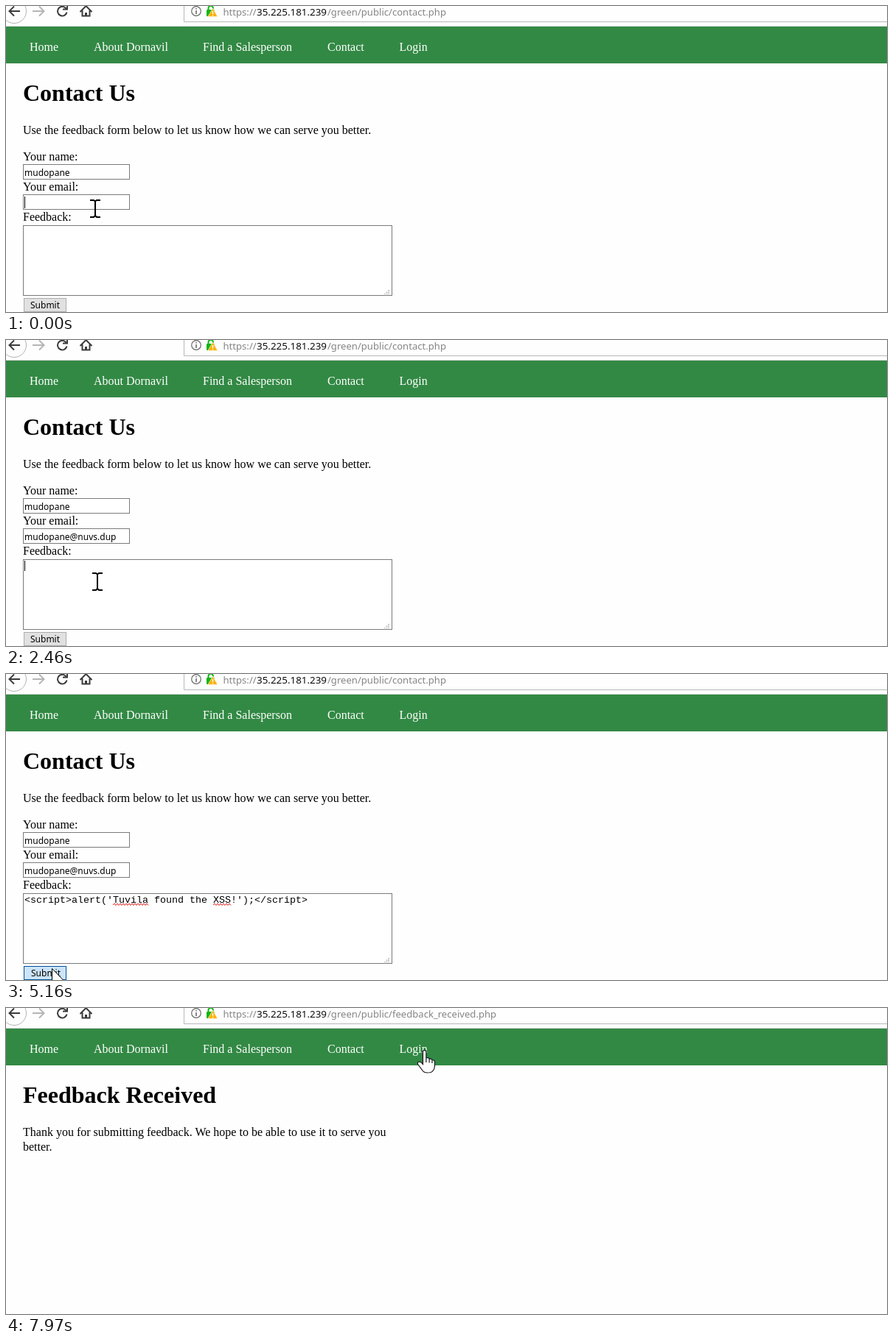
An HTML page that plays this animation: 1195x416 px, repeating every 8 s.

```html
<!DOCTYPE html>
<html lang="en">
<head>
<meta charset="utf-8">
<title>Feedback form</title>
<style>
  html, body { margin: 0; width: 100%; height: 100%; overflow: hidden; background: #fefefe; }
  svg { display: block; width: 100%; height: 100%; }
  text { white-space: pre; }
  .page { font: 16px "Liberation Serif", serif; }
  .title { font: bold 32px "Liberation Serif", serif; }
  .ui { font: 12px "Noto Sans", "Open Sans", sans-serif; }
  .menu { font: 11.5px "Noto Sans", "Open Sans", sans-serif; }
  .url { font: 13.1px "Noto Sans", "Open Sans", sans-serif; fill: #858585; }
  .code { font: 13.333px "Liberation Mono", monospace; }
  .field { fill: #fff; stroke: #7a7a7a; }
  .icon { fill: none; stroke: #3b3b3d; stroke-width: 2; }
  .caret { stroke: #000; }
  u, .u { text-decoration: underline; }
</style>
</head>
<body>
<svg viewBox="0 0 1195 416" preserveAspectRatio="none">
  <rect width="1195" height="416" fill="#fefefe"/>

  <g id="toolbar">
    <path d="M0 27.5H1195" stroke="#d4d4d6"/>
    <circle cx="11" cy="7" r="16.5" fill="#fdfdfd" stroke="#b4b4b6"/>
    <path class="icon" d="M19 7H5M11 .5L4.5 7L11 13.500"/>
    <path class="icon" style="stroke:#b5b5b7" d="M36 7H51M45 .5L51.500 7L45 13.500"/>
    <path id="reload" class="icon" d="M81.500 3.500A6.300 6.300 0 1 0 82.500 8.500M83 -1V4.500H77"/>
    <path id="stop" class="icon" d="M69.500 1L82 13.500M82 1L69.500 13.500"/>
    <path class="icon" d="M100.500 8L108.500 0L116.500 8M103.500 6V13.500H113.500V6"/>
    <path d="M107 9h3v5h-3z" fill="#3b3b3d"/>
    <path d="M241.500 -1V21.500H1196" fill="none" stroke="#b8b8ba"/>
    <circle cx="258" cy="7" r="6.300" fill="none" stroke="#6a6a6c" stroke-width="1.200"/>
    <path d="M258 6V11M258 3V4.600" stroke="#6a6a6c" stroke-width="1.600"/>
    <path d="M274.500 6V3a3.200 3.200 0 0 1 6.400 0V6" fill="none" stroke="#12b512" stroke-width="2"/>
    <rect x="272" y="5" width="11" height="9" rx="1" fill="#12b512"/>
    <path d="M280.500 3L287 14.500H274Z" fill="#ffb000" stroke="#fff" stroke-width=".7"/>
    <path d="M280.500 7V11M280.500 12V13.500" stroke="#fff" stroke-width="1.400"/>
    <g class="url">
      <text x="294.500" y="13">https://</text>
      <text x="340" y="13" fill="#0c0c0d" style="font-size:13.400px">35.225.181.239</text>
      <text id="path" x="436" y="13"></text>
    </g>
  </g>

  <g class="page">
    <rect y="28" width="1195" height="50" fill="#328944"/>
    <g id="nav" fill="#fff"></g>
  </g>

  <g id="form" class="page">
    <text class="title" x="23" y="129">Contact Us</text>
    <text x="23" y="174">Use the feedback form below to let us know how we can serve you better.</text>
    <text x="23" y="210">Your name:</text>
    <rect class="field" x="23.500" y="215.500" width="144" height="20"/>
    <text class="ui" x="25" y="231">mudopane</text>
    <text x="23" y="251">Your email:</text>
    <rect class="field" x="23.500" y="256.500" width="144" height="20"/>
    <text id="email" class="ui" x="25" y="272"></text>
    <path id="emailCaret" class="caret" d="M.5 259V275"/>
    <text x="23" y="292">Feedback:</text>
    <rect class="field" x="23.500" y="298.500" width="500" height="95"/>
    <path d="M519 386v6M516.500 388.500v3.500M514 391v1" stroke="#a8a8a8" stroke-width="1.500" stroke-dasharray="1.500 1"/>
    <g id="payload">
      <text id="script" class="code" x="25" y="311"></text>
      <path id="squiggle" fill="none" stroke="#e02020"/>
    </g>
    <path id="areaCaret" class="caret" d="M.5 300V314"/>
    <rect id="button" x="24.500" y="397.500" width="57" height="18"/>
    <text id="submit" class="ui" y="411">Submit</text>
  </g>

  <g id="thanks" class="page">
    <text class="title" x="23" y="129">Feedback Received</text>
    <text x="23" y="174">Thank you for submitting feedback. We hope to be able to use it to serve you</text>
    <text x="23" y="194">better.</text>
  </g>

  <g id="menu" class="menu">
    <path d="M128 332H284V420H128Z" fill="#000" opacity=".2"/>
    <path d="M128 331H283V420H128Z" fill="#000" opacity=".35"/>
    <rect x="124.500" y="328.500" width="156" height="100" fill="#f1f1f1" stroke="#c4c4c4"/>
    <path d="M148 349.500H279" stroke="#d2d2d2"/>
    <rect id="hover" x="126" width="153" height="18" fill="#90c8f6"/>
    <text x="150" y="344"><tspan class="u">U</tspan>ndo</text>
    <text x="150" y="365">Cu<tspan class="u">t</tspan></text>
    <text x="150" y="383"><tspan class="u">C</tspan>opy</text>
    <text x="150" y="401"><tspan class="u">P</tspan>aste</text>
    <text x="150" y="419" fill="#6d6d6d"><tspan class="u">D</tspan>elete</text>
  </g>

  <path id="arrow" d="M.5 .5V23.500L5.700 18.500L9.500 26.700L13 25.200L9.300 17H16.500Z" fill="#fff" stroke="#000"/>
  <path id="beam" d="M-7 -11H-2L0 -9.500L2 -11H7M0 -10V10M-7 12H-2L0 10L2 12H7" fill="none" stroke="#000" stroke-width="2"/>
  <path id="hand" d="M-1.500 18V2.500a2.200 2.200 0 0 1 4.400 0V11q3.600 -1.300 4.200 1.300q3.300 -.9 4 1.500q3.400 -.4 3.400 2.600V22q0 4 -3 7Q10 31 4.500 31Q0 31 -2 28L-8.300 19.500Q-9.500 16.500 -6.500 16Q-4.500 16 -1.500 19.500ZM2.900 11v6M7.100 12.500v5M11 14v4" fill="#fff" stroke="#16161c" stroke-width="1.200"/>
</svg>

<script>
const LOOP = 8000;
const EMAIL = 'mudopane@nuvs.dup';
const SCRIPT = "<script>alert('Tuvila found the XSS!');<\/script>";
const $ = id => document.getElementById(id);
const show = (id, on) => $(id).setAttribute('visibility', on ? 'visible' : 'hidden');
const set = (id, attrs) => { for (const k in attrs) $(id).setAttribute(k, attrs[k]); };
const write = (id, s) => { if ($(id).textContent !== s) $(id).textContent = s; };

// Pointer poses: time, shape, x, y. Each holds until the next.
const poses = [
  [0, 'beam', 121, 275], [440, '', 0, 0], [1950, 'arrow', 115, 283],
  [2080, 'arrow', 117, 288], [2210, 'beam', 120, 310], [2335, 'beam', 123, 323], [2460, 'beam', 124, 328],
  [2900, 'arrow', 124, 328], [3050, 'arrow', 151, 357], [3170, 'arrow', 158, 370],
  [3300, 'arrow', 167, 383], [3430, 'arrow', 176, 394], [3550, 'arrow', 183, 400], [3830, 'arrow', 187, 403],
  [4110, 'arrow', 180, 403], [4240, 'arrow', 160, 403], [4370, 'arrow', 135, 402], [4500, 'arrow', 108, 402],
  [4630, 'arrow', 85, 401], [4750, 'arrow', 70, 400], [4890, 'arrow', 64, 400], [5020, 'arrow', 62, 400]
];

// Adds n evenly timed stops of an eased move.
function glide(t0, t1, n, [x0, y0], [x1, y1], shapeAt) {
  for (let i = 1; i <= n; i++) {
    const p = i / n, e = p * p * (3 - 2 * p);
    const x = x0 + (x1 - x0) * e, y = y0 + (y1 - y0) * e;
    poses.push([t0 + (t1 - t0) * (i - 1) / (n - 1), shapeAt(y), Math.round(x), Math.round(y)]);
  }
}
glide(6160, 7000, 7, [62, 400], [244, 201], () => 'arrow');
glide(7270, 7970, 6, [244, 201], [567, 57], y => y < 78 ? 'hand' : 'arrow');

// Characters present in the email field from each time on.
const typed = [[0, 0], [440, 1], [590, 3]];
for (let i = 0; i < 7; i++) typed.push([1020 + 155 * i, 5 + 2 * i]);

const last = (list, t) => list.filter(k => k[0] <= t).pop();

function wave(x, end) {
  let d = `M${x} 314`;
  for (let i = 1; x + 2 * i <= end; i++) d += `L${x + 2 * i} ${i % 2 ? 312 : 314.5}`;
  return d;
}

[['Home', 32], ['About Dornavil', 119], ['Find a Salesperson', 267], ['Contact', 436], ['Login', 533.5]]
  .forEach(([label, x]) => {
    const el = document.createElementNS('http://www.w3.org/2000/svg', 'text');
    el.setAttribute('x', x);
    el.setAttribute('y', 61);
    el.textContent = label;
    $('nav').append(el);
  });
write('script', SCRIPT);
set('squiggle', { d: wave(145, 193) + wave(281, 305) });

function render(t) {
  const sent = t >= 6020;
  const menuOpen = t >= 2900 && t < 3980;
  const pasted = t >= 3980 && !sent;
  const [, shape, x, y] = last(poses, t);

  show('form', !sent);
  show('thanks', sent);
  write('path', sent ? '/green/public/feedback_received.php' : '/green/public/contact.php');

  const loading = t >= 5320 && t < 6560;
  show('reload', !loading);
  show('stop', loading);
  $('stop').style.stroke = sent ? '#b9b9bb' : '#3b3b3d';

  const n = last(typed, t)[1];
  write('email', EMAIL.slice(0, n));
  const width = n ? $('email').getComputedTextLength() : 0;
  set('emailCaret', { transform: `translate(${Math.round(25 + width)} 0)` });
  show('emailCaret', t < 2335);

  show('payload', pasted);
  set('areaCaret', { transform: `translate(${pasted ? 409 : 25} 0)` });
  show('areaCaret', t >= 2335 && t < 5020 && !menuOpen);

  const over = t >= 4750, down = t >= 5160 && t < 5320;
  set('button', {
    fill: down ? '#cce4f7' : over ? '#e5f1fb' : '#e1e1e1',
    stroke: down ? '#005499' : over ? '#0078d7' : '#adadad',
    visibility: sent ? 'hidden' : 'visible'
  });
  set('submit', { x: down ? 34 : 33 });

  show('menu', menuOpen);
  show('hover', menuOpen && y >= 351);
  set('hover', { y: y < 369 ? 351 : y < 387 ? 369 : 387 });

  for (const id of ['arrow', 'beam', 'hand']) show(id, id === shape);
  if (shape) set(shape, { transform: `translate(${x} ${y})` });
}

const start = performance.now();
function tick() {
  render((performance.now() - start) % LOOP);
  requestAnimationFrame(tick);
}
tick();
</script>
</body>
</html>
```
